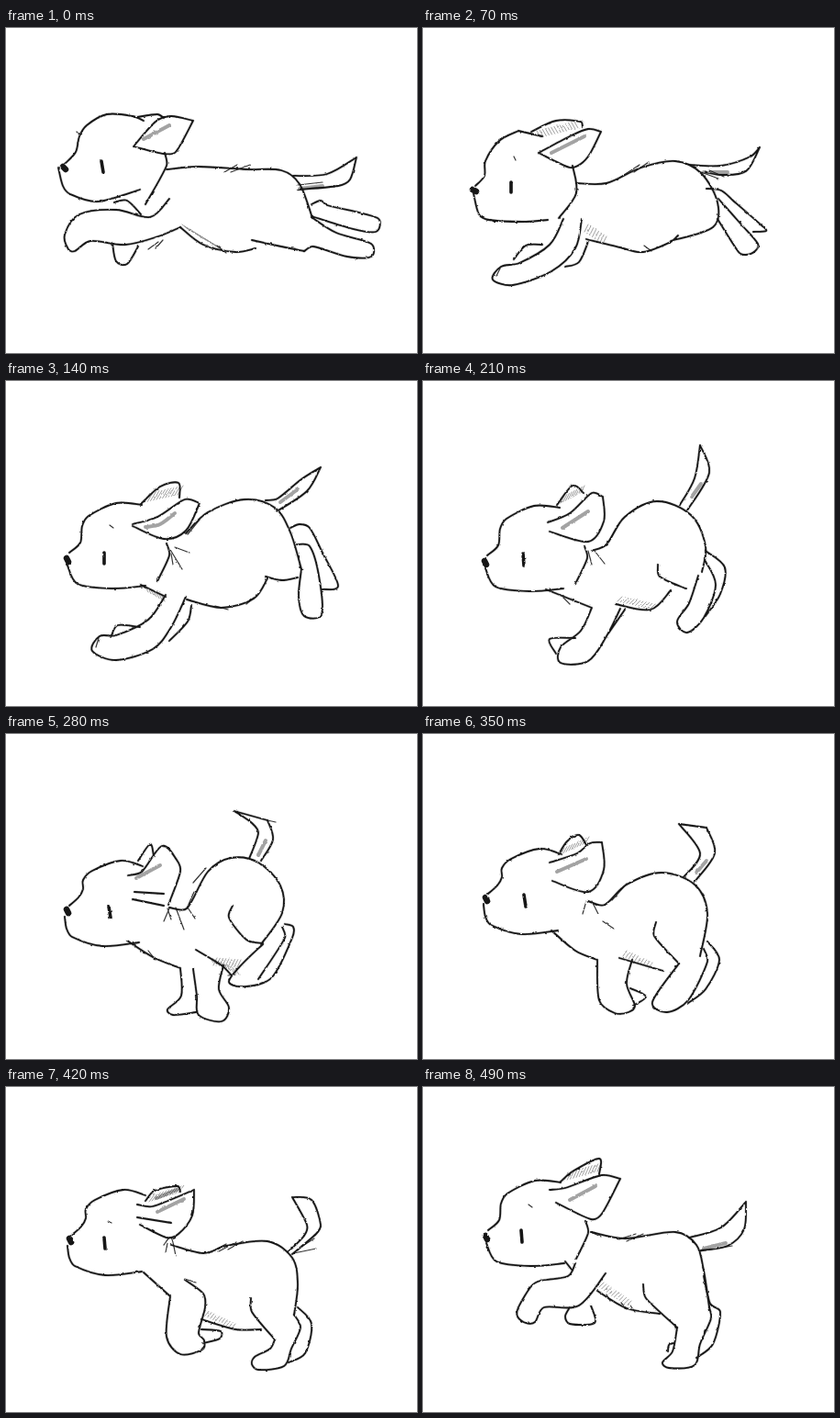
Write an HTML page that moves like this. It is 448x354 px and loops after 560 ms.

```html
<!DOCTYPE html>
<html lang="en">
<head>
<meta charset="utf-8">
<title>Running puppy</title>
<style>
html, body { margin: 0; width: 100%; height: 100%; overflow: hidden; background: #fff; }
svg { display: block; width: 448px; height: 354px; }
path { fill: none; stroke: #151515; stroke-width: 1.8; stroke-linecap: round; stroke-linejoin: round; }
.halo { stroke-width: 3.2; opacity: .16; }
.fur { stroke-width: 1.2; opacity: .85; }
.soft { stroke-width: 4; opacity: .4; }
.hatch { stroke-width: .8; opacity: .5; }
.eye { stroke-width: 3.6; }
.nose { stroke-width: 6.5; }
.pose { visibility: hidden; animation: show 560ms step-end infinite; }
@keyframes show { 0% { visibility: visible; } 12.5%, 100% { visibility: hidden; } }
</style>
</head>
<body>
<svg viewBox="0 0 448 354">
  <defs>
    <filter id="pencil" filterUnits="userSpaceOnUse" x="0" y="0" width="448" height="354">
      <feTurbulence type="fractalNoise" baseFrequency=".22" numOctaves="2" seed="4"/>
      <feDisplacementMap in="SourceGraphic" scale="2.2" xChannelSelector="R" yChannelSelector="G"/>
    </filter>
    <g id="lifted">
      <path d="M69 187 81 176 83 158 90 147 120 133 148 135M67 201 78 221 115 226 152 223M175 177 178 190 165 218"/>
      <path class="nose" d="M66 193 68 197"/>
    </g>
    <g id="level">
      <path d="M72 161 82 152 87 143 87 133 97 123 128 112 152 118M67 173 69 186 75 195 108 205 148 201"/>
      <path class="nose" d="M69 165 71 169"/>
    </g>
  </defs>

  <g class="pose">
    <path d="M65 147 76 135 80 118 88 106 110 94 138 96 150 101M57 152 62 172 70 181 100 189 146 176M173 136 175 150 152 192"/>
    <path class="nose" d="M62 151 65 154"/><path class="eye" d="M104 145 106 157"/>
    <path d="M139 129 163 102 180 96 204 101M204 101 185 135 172 137 139 129M143 97 165 94 172 98"/>
    <path d="M175 154 210 151 262 154 300 155 320 170 334 207M190 217 215 236 250 244 272 240M268 231 300 238 325 243"/>
    <path d="M178 186 157 206 120 198 80 203 64 225 68 241 75 243 92 232 130 236 166 227 190 217M116 234 120 254 132 257 144 238M118 190 132 188 147 203"/>
    <path d="M333 192 343 188 350 193 405 207 403 222 375 218 333 205M333 206 360 223 398 235 398 249 372 249 335 238 325 243"/>
    <path d="M313 161 350 159 382 141M382 141 375 165 362 172 318 176"/>
    <path class="fur" d="M80 116 77 113M238 157 252 149M245 157 266 149M155 241 166 233M163 240 171 231M240 245 230 237M318 171 345 168"/>
    <path class="soft" d="M150 121 178 106M320 175 345 172"/>
    <path class="hatch" data-tick="6 5" d="M192 214 228 236"/>
  </g>

  <g class="pose">
    <path d="M57 172 67 161 68 145 83 123 104 112M104 112 130 118M55 180 61 203 72 209 108 211 136 209M163 150 167 180 148 207"/>
    <path class="nose" d="M54 176 58 178"/><path class="eye" d="M96 168 96 179"/>
    <path d="M126 136 160 118 180 110 194 113M194 113 182 137 172 148 160 152 126 136M118 113 145 101 172 102 174 108"/>
    <path d="M167 169 200 169 238 152 275 145 303 158 321 190 316 217 270 232M178 230 215 239 240 244 270 233 278 226"/>
    <path d="M153 208 138 236 105 256 85 260 76 274 98 280 140 265 166 240 173 208M130 236 112 237 99 252M155 260 170 255 180 233"/>
    <path d="M309 175 325 177 338 188 369 215 374 221 360 222M321 208 344 244 352 247 362 243 365 235 346 213 322 186"/>
    <path d="M290 149 325 150 357 140 367 130M367 130 352 156 325 160 308 157"/>
    <path class="fur" d="M213 164 236 149M230 157 246 146M303 157 322 164M312 155 328 162M249 243 241 237M84 262 80 270M99 140 101 144"/>
    <path class="soft" d="M140 136 176 118M306 157 332 157"/>
    <path class="hatch" data-tick="4 7" d="M124 112 165 102"/>
    <path class="hatch" data-tick="4 -8" d="M176 222 196 235"/>
  </g>

  <g class="pose">
    <use href="#lifted"/><path class="eye" d="M107 187 107 199"/>
    <path d="M138 156 165 148 195 129 211 133M211 133 196 163 172 172 138 158M147 134 168 115 188 111 189 127"/>
    <path d="M196 166 220 143 260 129 293 138 310 165 322 205M197 238 235 247 270 237 285 215M283 213 300 217 318 214"/>
    <path d="M174 233 155 260 120 277 102 278 94 294 120 304 160 292 180 268 196 235M115 277 122 266 146 268M178 283 198 262 202 245M147 222 174 235"/>
    <path d="M310 160 320 156 331 160 345 187 362 223 345 227M317 178 331 180 341 212 344 254 325 256 319 235 322 205"/>
    <path d="M283 130 296 128 322 107 343 94M343 94 328 120 295 142"/>
    <path class="fur" d="M198 167 211 151M178 182 192 205M184 181 200 187M180 188 182 200M228 245 242 249M262 243 270 236M101 280 98 290M113 157 117 160"/>
    <path class="soft" d="M152 159 168 156 184 144M299 132 318 118"/>
    <path class="hatch" data-tick="6 -10" d="M151 132 187 124"/>
    <path class="hatch" data-tick="3 6" d="M152 224 170 234"/>
  </g>

  <g class="pose">
    <use href="#lifted" x="1" y="3"/><path class="eye" d="M109 188 110 201"/>
    <path d="M136 154 160 144 184 122 196 126M196 126 197 153 180 175 138 164M146 135 163 114 175 122"/>
    <path d="M184 185 200 178 220 148 255 131 292 146 308 180 304 208M210 243 248 249 270 228M256 200 258 213 286 226"/>
    <path d="M134 227 184 247M184 247 172 272 150 290 150 307 180 305 200 278 215 248M166 280 138 281 145 297M202 275 220 249"/>
    <path d="M300 212 290 242 277 262 288 274 306 258 319 222 307 195M308 185 329 203 324 232 308 256"/>
    <path d="M280 135 296 106 302 70M302 70 312 100 288 141"/>
    <path class="fur" d="M203 174 213 157M180 185 184 200M187 185 198 199M160 243 153 236"/>
    <path class="soft" d="M152 160 180 142M293 126 303 112"/>
    <path class="hatch" data-tick="4 -8" d="M150 133 172 122"/>
    <path class="hatch" data-tick="5 -5" d="M212 240 248 248"/>
  </g>

  <g class="pose">
    <use href="#level" x="-3" y="26"/><path class="eye" d="M112 188 114 200"/>
    <path d="M133 154 148 150 170 122 186 137 190 150 177 186M140 172 172 174M138 180 172 187M144 138 157 120 161 133"/>
    <path d="M178 189 197 190 220 150 245 135 275 140 299 165 301 195 278 229M207 235 235 252 245 262M247 187 243 200 262 224 280 228"/>
    <path d="M132 225 160 243 190 255M190 255 191 285 176 300 182 306 207 303M204 256 208 285 210 306 235 313 243 298 232 278 237 252"/>
    <path d="M280 229 258 250 243 270 262 275 290 265 312 222 313 210 304 207M301 210 304 222 275 267"/>
    <path d="M265 136 275 108 268 97 249 84M249 84 285 94M285 94 291 115 278 138"/>
    <path class="fur" d="M197 190 205 172M204 162 218 146M178 190 172 204M176 190 180 202M185 189 194 213M198 189 206 201M155 236 163 246M285 94 294 96M242 263 250 262"/>
    <path class="soft" d="M142 157 168 143M275 132 283 116"/>
    <path class="hatch" data-tick="4 6" d="M222 243 250 256"/>
    <path class="hatch" data-tick="-4 8" d="M230 244 256 246"/>
  </g>

  <g class="pose">
    <use href="#level" x="-1" y="13"/><path class="eye" d="M110 175 112 188"/>
    <path d="M138 140 168 130 182 119 195 118M195 118 197 148 180 172 141 160M148 131 157 117 170 110 178 121"/>
    <path d="M180 182 198 186 222 164 260 151 296 164 310 195 302 242M214 244 262 258M254 205 252 220 279 250"/>
    <path d="M140 214 166 236 190 246M190 246 192 290 209 304 224 303 231 296 222 272 228 246M226 277 243 286 229 296"/>
    <path d="M279 250 250 292 266 303 289 290 310 248 306 234M310 226 323 246 308 278 289 293"/>
    <path d="M284 156 302 130 279 98M279 98 309 102M309 102 318 130 296 161"/>
    <path class="fur" d="M206 181 222 163M178 182 174 196M184 182 191 196M196 204 208 212"/>
    <path class="soft" d="M146 150 178 136M298 151 309 138"/>
    <path class="hatch" data-tick="4 -7" d="M150 131 177 119"/>
    <path class="hatch" data-tick="4 -6" d="M218 242 246 255"/>
  </g>

  <g class="pose">
    <use href="#level"/><path class="eye" d="M107 164 108 176"/>
    <path d="M143 128 160 130 205 112M205 112 203 140 188 160 175 164 146 150M143 142 180 148M152 124 162 113 187 108 190 114"/>
    <path d="M180 172 215 181 240 173 285 168 312 186 318 215 314 248M213 253 250 264 278 264M267 230 268 245 293 275"/>
    <path d="M150 202 179 228M179 228 175 272 190 291 214 286 216 276 210 268 217 240 215 225 195 210M213 264 234 266 233 274 215 279"/>
    <path d="M293 275 288 285 271 294 268 302 275 308 303 304 311 285 321 262 314 248M318 240 333 258 326 290 308 300"/>
    <path d="M307 180 325 162 328 150 312 120M312 120 333 123 343 150 338 160 312 182"/>
    <path class="fur" d="M221 181 240 171M232 179 251 169M242 177 258 168M172 172 180 164 185 184M176 170 174 180M314 181 338 176M322 174 336 165M195 209 207 213M111 146 115 148"/>
    <path class="soft" d="M165 136 194 122M164 121 186 112"/>
    <path class="hatch" data-tick="6 -8" d="M156 125 188 115"/>
    <path class="hatch" data-tick="4 -5" d="M214 248 246 263"/>
  </g>

  <g class="pose">
    <use href="#lifted" x="2" y="-31"/><path class="eye" d="M107 156 108 169"/>
    <path d="M138 112 155 110 195 96 215 100M215 100 195 138 183 144 145 126M150 103 163 92 192 78 192 95"/>
    <path d="M183 158 220 165 275 158 298 172 306 200 312 240M190 222 222 241 258 247M240 215 243 230 277 262"/>
    <path d="M166 192 158 206 128 211 118 217 104 240 103 250 112 257 122 256 132 240 170 238 199 203M160 240 155 250 160 258 187 257 183 238M155 190 163 200"/>
    <path d="M277 262 272 288 261 300 268 306 296 303 302 280 314 252 312 240M306 206 313 236 324 245 316 280 298 295M267 288 268 281 273 279"/>
    <path d="M290 164 325 153 352 125M352 125 350 155 332 173 303 178"/>
    <path class="fur" d="M183 158 194 163M213 166 232 160M222 168 240 160M302 179 337 173M204 233 200 226M222 242 216 235M231 245 226 238M115 128 119 131"/>
    <path class="soft" d="M160 123 188 108M306 176 330 170"/>
    <path class="hatch" data-tick="4 -9" d="M154 102 190 92"/>
    <path class="hatch" data-tick="5 -5" d="M192 218 222 238"/>
  </g>
</svg>
<script>
// Pairs up the coordinates of each stroke in a path.
const strokes = d => d.split('M').slice(1).map(text => {
  const values = text.trim().split(' ').map(Number);
  return values.flatMap((v, i) => i % 2 ? [] : [[v, values[i + 1]]]);
});

// Smooth curve through every point.
function curve(p) {
  let d = `M${p[0]}`;
  for (let i = 0; i < p.length - 1; i++) {
    const b = p[i], c = p[i + 1], a = p[i - 1] || b, e = p[i + 2] || c;
    const length = Math.hypot(c[0] - b[0], c[1] - b[1]);
    // Long neighbours must not throw a short span into a loop.
    const bend = (from, to) => {
      const span = Math.hypot(to[0] - from[0], to[1] - from[1]) || 1;
      const k = Math.min(1 / 6, length * .36 / span);
      return [(to[0] - from[0]) * k, (to[1] - from[1]) * k];
    };
    const out = bend(a, c), back = bend(b, e);
    d += `C${b[0] + out[0]},${b[1] + out[1]} ${c[0] - back[0]},${c[1] - back[1]} ${c}`;
  }
  return d;
}

// Parallel pencil ticks along a straight base.
function ticks([[x, y], [u, v]], offset) {
  const count = Math.ceil(Math.hypot(u - x, v - y) / 3.5);
  let d = '';
  for (let i = 0; i <= count; i++) d += `M${x + (u - x) * i / count} ${y + (v - y) * i / count}l${offset}`;
  return d;
}

for (const path of document.querySelectorAll('path')) {
  const tick = path.dataset.tick;
  const shape = p => tick ? ticks(p, tick) : curve(p);
  path.setAttribute('d', strokes(path.getAttribute('d')).map(shape).join(''));
  if (!path.classList.length) {
    const halo = path.cloneNode();
    halo.classList.add('halo');
    path.before(halo);
  }
}

const poses = document.querySelectorAll('.pose');
poses.forEach((pose, i) => {
  pose.setAttribute('filter', 'url(#pencil)');
  pose.style.animationDelay = `${(i - poses.length) * 70}ms`;
});
</script>
</body>
</html>
```
